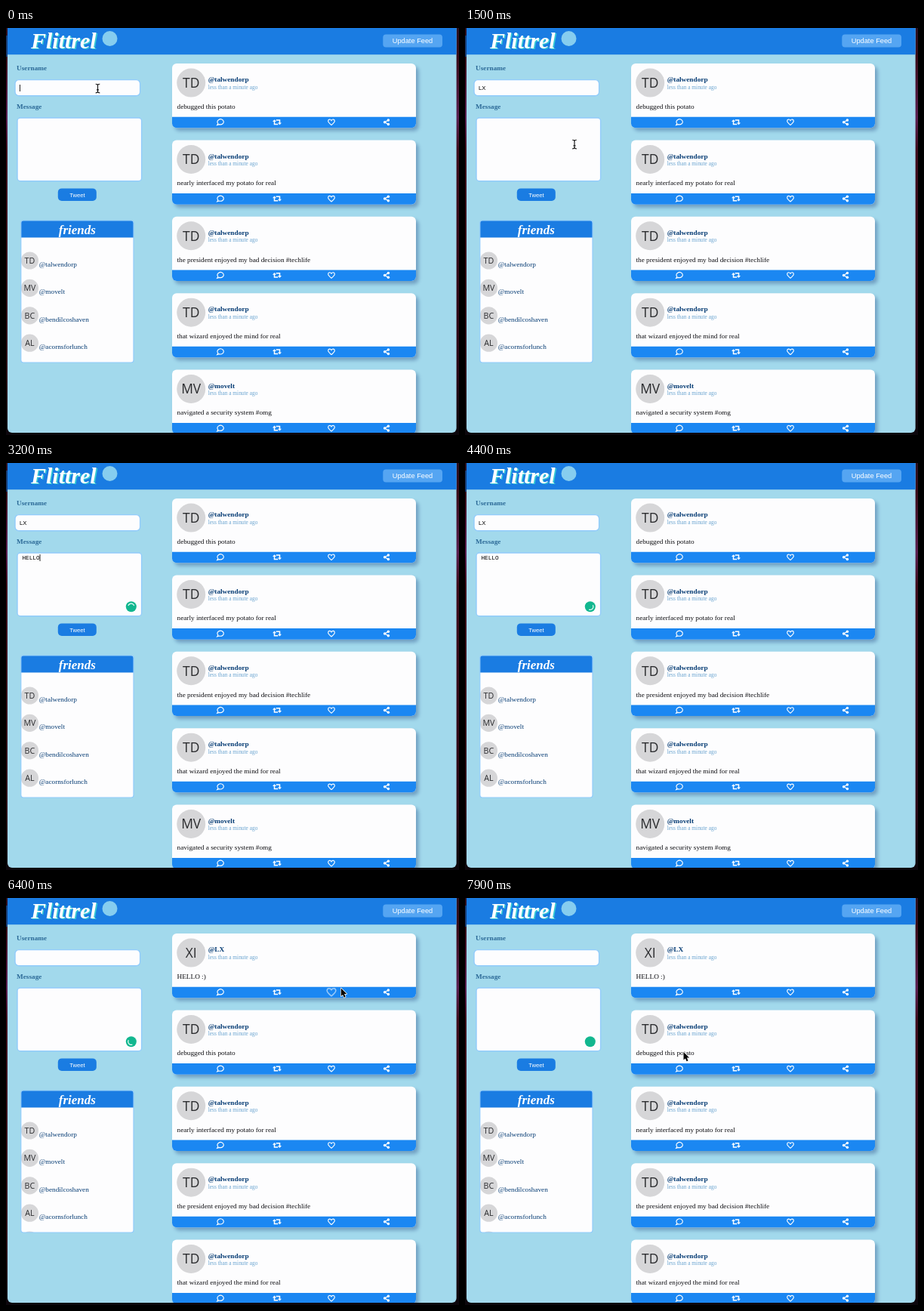
An HTML page with a canvas that plays this animation: 600x539 px, repeating every 8000 ms.

```html
<!DOCTYPE html>
<html lang="en">
<head>
<meta charset="utf-8">
<title>Feed</title>
<style>
html, body { margin: 0; width: 100%; height: 100%; overflow: hidden; background: #160a12; }
canvas { display: block; width: 600px; height: 539px; }
</style>
</head>
<body>
<canvas id="stage"></canvas>
<script>
const W = 600, H = 539, LOOP = 8000;
const canvas = document.getElementById('stage');
const ctx = canvas.getContext('2d');
const dpr = window.devicePixelRatio || 1;
canvas.width = W * dpr;
canvas.height = H * dpr;

const SERIF = '"Liberation Serif", serif';
const SANS = '"Liberation Sans", sans-serif';
const MONO = '"Liberation Mono", monospace';
const ROUND = '"Open Sans", "Noto Sans", sans-serif';
const BLUE = '#1a7ce2', BAR = '#1b87f2', EDGE = '#92ccfb', NAVY = '#063c74';

const POSTS = [
  ['TD', '@talwendorp', 'debugged this potato'],
  ['TD', '@talwendorp', 'nearly interfaced my potato for real'],
  ['TD', '@talwendorp', 'the president enjoyed my bad decision #techlife'],
  ['TD', '@talwendorp', 'that wizard enjoyed the mind for real'],
  ['MV', '@movelt', 'navigated a security system #omg']
];
const OWN_POST = ['XI', '@LX', 'HELLO :)'];
const FRIENDS = [['TD', '@talwendorp'], ['MV', '@movelt'], ['BC', '@bendilcoshaven'], ['AL', '@acornsforlunch']];

// Typing and clicks, in ms
const NAME = 'LX', NAME_KEYS = [500, 700];
const MESSAGE = 'HELLO :)', MESSAGE_KEYS = [2100, 2300, 2500, 2700, 2900, 4600, 4750, 4950];
const FOCUS_MESSAGE = 1600, SEND = 5850, SPIN_START = 2600, SPIN_END = 7200;

// Pointer: time, x, y
const PATH = [
  [0, 121.5, 80], [1000, 121.5, 80], [1450, 145, 154], [5150, 145, 154],
  [5500, 99.5, 205.5], [5700, 97, 219], [5850, 97, 219], [6300, 434, 123],
  [6400, 443.5, 119.5], [6700, 504, 123], [7000, 504, 123], [7350, 359, 123],
  [7600, 290, 150], [7850, 289.5, 204], [8000, 289.5, 204]
];

function box(x, y, w, h, r, fill, stroke, line = 1.2) {
  ctx.beginPath();
  ctx.roundRect(x, y, w, h, r);
  if (fill) { ctx.fillStyle = fill; ctx.fill(); }
  if (stroke) { ctx.strokeStyle = stroke; ctx.lineWidth = line; ctx.stroke(); }
}

function disc(x, y, r, fill) {
  ctx.beginPath();
  ctx.arc(x, y, r, 0, Math.PI * 2);
  ctx.fillStyle = fill;
  ctx.fill();
}

function label(str, x, y, font, fill, align = 'left') {
  ctx.font = font;
  ctx.fillStyle = fill;
  ctx.textAlign = align;
  ctx.fillText(str, x, y);
}

function poly(points) {
  ctx.beginPath();
  points.forEach(([x, y], i) => i ? ctx.lineTo(x, y) : ctx.moveTo(x, y));
}

function avatar(text, x, y, r, size) {
  disc(x, y, r, '#d6d6d8');
  label(text, x, y + size * 0.36, `${size}px ${ROUND}`, '#2a2b2e', 'center');
}

const ICONS = {
  comment() {
    ctx.beginPath();
    ctx.ellipse(0.1, -0.3, 4.2, 3.5, 0, Math.PI * 0.78, Math.PI * 2.62);
    ctx.lineTo(-4.3, 3.8);
    ctx.closePath();
    ctx.stroke();
  },
  repeat() {
    ctx.lineWidth = 1.5;
    for (const side of [1, -1]) {
      ctx.save();
      ctx.scale(side, side);
      poly([[-3.5, -1.5], [-3.5, 2.7], [1.3, 2.7]]);
      ctx.stroke();
      poly([[-6, -0.7], [-3.5, -3.5], [-1, -0.7]]);
      ctx.fill();
      ctx.restore();
    }
  },
  heart() {
    ctx.beginPath();
    ctx.moveTo(0, 3.9);
    ctx.bezierCurveTo(-2.2, 1.9, -4.3, 0.4, -4.3, -1.4);
    ctx.bezierCurveTo(-4.3, -4.2, -1.2, -4.3, 0, -2.2);
    ctx.bezierCurveTo(1.2, -4.3, 4.3, -4.2, 4.3, -1.4);
    ctx.bezierCurveTo(4.3, 0.4, 2.2, 1.9, 0, 3.9);
    ctx.stroke();
  },
  share() {
    const dots = [[2.4, -2.8], [-2.4, 0], [2.4, 2.8]];
    poly(dots);
    ctx.stroke();
    for (const [x, y] of dots) disc(x, y, 1.75, '#fff');
  }
};
const ICON_X = { comment: 284, repeat: 359, heart: 431, share: 504 };

function icon(name, y, p) {
  const x = ICON_X[name];
  const near = p && p.arrow ? Math.hypot(p.x - x, p.y - y) : 99;
  const hover = Math.max(0, Math.min(1, (19 - near) / 5));
  ctx.save();
  ctx.translate(x, y);
  ctx.scale(1 + hover * 0.35, 1 + hover * 0.35);
  ctx.globalAlpha = 1 - hover * 0.45;
  ctx.strokeStyle = ctx.fillStyle = '#fff';
  ctx.lineWidth = 1.15;
  ICONS[name]();
  ctx.restore();
}

function card([initials, handle, text], y, p) {
  ctx.save();
  ctx.shadowColor = 'rgba(60,100,150,.5)';
  ctx.shadowBlur = 5 * dpr;
  ctx.shadowOffsetX = 3.5 * dpr;
  ctx.shadowOffsetY = 4 * dpr;
  box(220, y, 323, 85.2, 6, '#fdfdfe');
  ctx.restore();
  box(220, y + 70.6, 323, 14.6, [0, 0, 6, 6], BAR);
  avatar(initials, 245.2, y + 25.5, 19, 17.4);
  label(handle, 267.7, y + 24.2, `bold 9.25px ${SERIF}`, NAVY);
  label(text, 226.5, y + 59.7, `9.25px ${SERIF}`, '#0e0e12');
  label('less than a minute ago', 267.7, y + 33.4, `7.4px ${SERIF}`, '#6aa4d0');
  for (const name in ICON_X) icon(name, y + 77.6, p);
}

function friends(extra) {
  ctx.save();
  box(19.8, 255, 149.2, 188, 3, '#fdfdfe');
  ctx.clip();
  ctx.fillStyle = BLUE;
  ctx.fillRect(19, 255, 151, 22.5);
  FRIENDS.forEach(([initials, handle], i) => {
    const y = 308 + i * 36.4;
    avatar(initials, 31.4, y, 11.6, 10.7);
    label(handle, 43.8, y + 7.9, `9.25px ${SERIF}`, NAVY);
  });
  if (extra) disc(31.4, 453.2, 11.6, '#d6d6d8');
  ctx.restore();
  box(19.8, 255, 149.2, 188, 3, null, EDGE);
  label('friends', 94.3, 273, `italic bold 17px ${SERIF}`, '#fff', 'center');
}

const typed = (str, keys, t) => str.slice(0, keys.filter(k => t >= k).length);

function caret(x, y, h, t, marks) {
  const last = Math.max(...marks.filter(m => t >= m));
  if (Math.floor((t - last) / 500) % 2) return;
  ctx.fillStyle = '#111';
  ctx.fillRect(x, y, 0.9, h);
}

function form(t) {
  label('Username', 14, 56.4, `bold 9.25px ${SERIF}`, '#2d6b98');
  label('Message', 14, 107.3, `bold 9.25px ${SERIF}`, '#2d6b98');
  box(12, 68.6, 165.6, 21.2, 5, '#fdfdfe', EDGE, 1.4);
  box(15, 119, 164.6, 83.8, 4, '#fdfdfe', EDGE, 1.4);
  box(68.8, 212.4, 51, 16.5, 5, BLUE);
  label('Tweet', 94.4, 223.6, `7.7px ${SANS}`, '#fff', 'center');

  if (t < SEND) {
    const name = typed(NAME, NAME_KEYS, t), message = typed(MESSAGE, MESSAGE_KEYS, t);
    label(name, 18, 82, `7.7px ${SANS}`, '#000');
    if (t < FOCUS_MESSAGE) caret(18 + ctx.measureText(name).width, 75, 9, t, [0, ...NAME_KEYS]);
    label(message, 21.5, 128.2, `7.7px ${MONO}`, '#000');
    if (t >= FOCUS_MESSAGE) caret(21.5 + ctx.measureText(message).width, 121, 9, t, [FOCUS_MESSAGE, ...MESSAGE_KEYS]);
  }
  if (t >= SPIN_START) {
    disc(165.8, 190.3, 7, '#12b78f');
    if (t < SPIN_END) {
      const mid = -Math.PI / 2 + (t - 3200) / 880 * Math.PI * 2;
      ctx.beginPath();
      ctx.arc(165.8, 190.3, 4.1, mid - 1.25, mid + 1.25);
      ctx.strokeStyle = '#e9fff8';
      ctx.lineWidth = 1.2;
      ctx.stroke();
    }
  }
}

function header() {
  ctx.fillStyle = BLUE;
  ctx.fillRect(0, 0, W, 35);
  ctx.fillStyle = 'rgba(60,140,215,.25)';
  ctx.fillRect(0, 35, W, 1);
  const font = `italic bold 30px ${SERIF}`;
  label('Flittrel', 34.6, 28, font, '#35c9d6');
  label('Flittrel', 33, 26.5, font, '#fff');
  disc(137.5, 14, 10, '#86cdef');
  box(499.3, 8.5, 78.7, 17, 4, '#55a5f2');
  label('Update Feed', 538.5, 20.2, `9.25px ${SANS}`, '#fff', 'center');
}

// The pointer hides while keys are pressed
function pointer(t) {
  if ((t >= 500 && t < 1000) || (t >= 2100 && t < 5150)) return null;
  const i = Math.max(1, PATH.findIndex(k => k[0] > t));
  const [t0, x0, y0] = PATH[i - 1], [t1, x1, y1] = PATH[i];
  const u = (t - t0) / (t1 - t0);
  const x = x0 + (x1 - x0) * u, y = y0 + (y1 - y0) * u;
  const beam = t < 5450 && (y < 91 || (y > 118 && y < 203));
  return { x, y, arrow: !beam };
}

function drawPointer(p) {
  ctx.save();
  ctx.translate(p.x, p.y);
  ctx.lineJoin = 'round';
  if (p.arrow) {
    poly([[0, 0], [0, 10.6], [2.4, 8.4], [4, 12.2], [6, 11.4], [4.4, 7.6], [7.6, 7.5]]);
    ctx.closePath();
    ctx.strokeStyle = '#fff';
    ctx.lineWidth = 1.5;
    ctx.stroke();
    ctx.fillStyle = '#080808';
    ctx.fill();
  } else {
    ctx.beginPath();
    for (const s of [-1, 1]) {
      ctx.moveTo(-2.8, s * 5.8);
      ctx.quadraticCurveTo(0, s * 5.8, 0, s * 4);
      ctx.quadraticCurveTo(0, s * 5.8, 2.8, s * 5.8);
    }
    ctx.moveTo(0, -4.2);
    ctx.lineTo(0, 4.2);
    ctx.moveTo(-1.5, 1.8);
    ctx.lineTo(1.5, 1.8);
    ctx.strokeStyle = '#151515';
    ctx.lineWidth = 1.15;
    ctx.stroke();
  }
  ctx.restore();
}

function backdrop() {
  const g = ctx.createLinearGradient(0, 0, 0, H);
  [[0, '#2a1020'], [0.07, '#3a0c18'], [0.22, '#5a2050'], [0.3, '#400d1c'], [0.85, '#2c0a18'], [1, '#0c070c']]
    .forEach(([at, color]) => g.addColorStop(at, color));
  ctx.fillStyle = g;
  ctx.fillRect(0, 0, W, H);
  ctx.fillStyle = '#163a70';
  ctx.fillRect(0, 10, 2, 28);
}

function draw(t) {
  const p = pointer(t), sent = t >= SEND;
  ctx.setTransform(dpr, 0, 0, dpr, 0, 0);
  backdrop();
  ctx.save();
  box(2, -8, 594.6, 544, 6, '#a2d9ec');
  ctx.clip();
  header();
  form(t);
  friends(sent);
  const feed = sent ? [OWN_POST, ...POSTS] : POSTS;
  feed.slice(0, 5).forEach((post, i) => card(post, 47.1 + i * 101.35, p));
  ctx.restore();
  if (p) drawPointer(p);
}

const start = performance.now();
function tick() {
  draw((performance.now() - start) % LOOP);
  requestAnimationFrame(tick);
}
tick();
</script>
</body>
</html>
```
